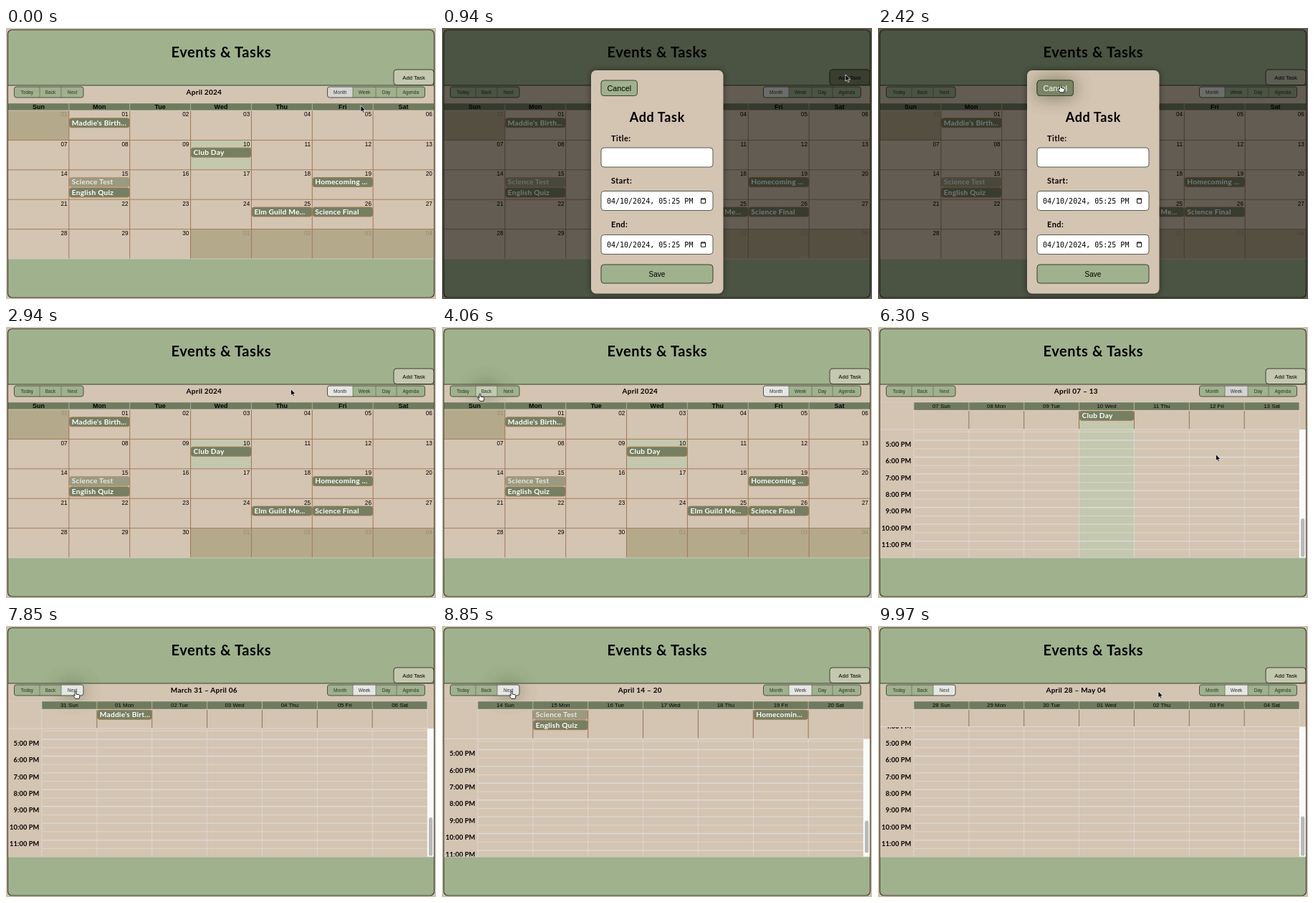
Animation, 600 px wide and 378 px high, one loop 10 s. Source, as an HTML page:

```html
<!DOCTYPE html>
<html lang="en">
<head>
<meta charset="utf-8">
<title>Events &amp; Tasks</title>
<style>
html, body { margin: 0; width: 100%; height: 100%; overflow: hidden; background: #d0c0ad; }
svg { display: block; width: 600px; height: 378px; }
text { font-family: "Liberation Sans", Arial, sans-serif; white-space: pre; }
.round { font-family: Lato, "Open Sans", sans-serif; font-weight: 700; }
.mono { font-family: "DejaVu Sans Mono", monospace; }
.mid { text-anchor: middle; }
.end { text-anchor: end; }
.tool { font-size: 6.6px; fill: #2f332c; }
.event { font-size: 10.2px; letter-spacing: .2px; fill: #fff; }
.past { opacity: .6; }
.glow { filter: url(#blur); fill: #4c5836; }
</style>
</head>
<body>
<svg id="stage" viewBox="0 0 600 378"></svg>
<script>
const LOOP = 10000;
const GREEN = '#9fb18d', TAN = '#d4c4b2', MUTED = '#b5a98c', DARK = '#707b5e',
      MOSS = '#757f62', PALE = '#c4c8ae', INK = '#3b4035', BROWN = '#a1764f';
const DAYS = ['Sun', 'Mon', 'Tue', 'Wed', 'Thu', 'Fri', 'Sat'];
const HOUR = 23.42, DAY_H = HOUR * 24, BOTTOM = 322;

const pad = n => String(n).padStart(2, '0');
const range = n => [...Array(n).keys()];
const rect = (x, y, w, h, fill, more = '') =>
  `<rect x="${x}" y="${y}" width="${w}" height="${h}" fill="${fill}" ${more}/>`;
const line = (x1, y1, x2, y2, color, w = 1) =>
  `<path d="M${x1} ${y1}L${x2} ${y2}" stroke="${color}" stroke-width="${w}"/>`;
const text = (x, y, s, cls = '', more = '') =>
  `<text x="${x}" y="${y}" class="${cls}" ${more}>${s.replace('&', '&amp;')}</text>`;
const event = (x, y, w, label, past) =>
  `<g class="${past ? 'past' : ''}">` +
  rect(x + .7, y, w - 1.2, 13, MOSS, `rx="3" stroke="${BROWN}" stroke-width=".9"`) +
  text(x + 4, y + 9.8, label, 'round event') + '</g>';

// Buttons: x, y, width, height, label, font size, hover text colour
const buttons = {
  today: [11.5, 82, 35.5, 15, 'Today'],
  back: [47, 82, 30, 15, 'Back'],
  next: [77, 82, 31, 15, 'Next'],
  month: [448.5, 82, 35.5, 15, 'Month'],
  week: [484, 82, 32, 15, 'Week'],
  day: [516, 82, 29, 15, 'Day'],
  agenda: [545, 82, 39.5, 15, 'Agenda'],
  add: [541, 58, 56, 21.5, 'Add Task', 7.7],
  cancel: [222, 73, 50.5, 21.5, 'Cancel', 10.8],
  save: [222, 330, 156, 26, 'Save', 10]
};
const TOOLS = ['today', 'back', 'next', 'month', 'week', 'day', 'agenda'];
const MODAL = ['cancel', 'save'];

const glow = id => {
  const [x, y, w, h] = buttons[id];
  return `<rect class="glow" id="glow-${id}" x="${x}" y="${y}" width="${w}" height="${h}" opacity="0"/>`;
};
const toolButton = id => {
  const [x, y, w, h, label] = buttons[id];
  return rect(x, y, w, h, GREEN, `id="face-${id}"`) +
    rect(x, y, w, h, '#c2cab0', `id="hover-${id}" opacity="0"`) +
    text(x + w / 2, 91.8, label, 'mid tool');
};
const toolGroup = (ids, clip) => {
  const [x, y] = buttons[ids[0]], last = buttons[ids[ids.length - 1]];
  const w = last[0] + last[2] - x;
  return `<clipPath id="${clip}">${rect(x, y, w, 15, '#000', 'rx="3"')}</clipPath>` +
    `<g clip-path="url(#${clip})">${ids.map(toolButton).join('')}` +
    ids.slice(1).map(id => line(buttons[id][0], y, buttons[id][0], y + 15, '#68735b', .8)).join('') + '</g>' +
    rect(x, y, w, 15, 'none', `rx="3" stroke="#4b5143"`);
};
const bigButton = (id, fill, hoverInk) => {
  const [x, y, w, h, label, size] = buttons[id];
  const shape = `rx="4" stroke="${INK}"`;
  const caption = ink => text(x + w / 2, y + h / 2 + size * .36, label, 'mid', `font-size="${size}" fill="${ink}"`);
  return rect(x, y, w, h, fill, shape) + caption('#000') +
    `<g id="hover-${id}" opacity="0">${rect(x, y, w, h, '#7a8464', shape)}${caption(hoverInk)}</g>`;
};

// Month view
const COL = 594 / 7, ROW = 41.4, TOP = 115;
const monthEvents = [
  [1, 0, 0, "Maddie's Birth..."], [3, 1, 0, 'Club Day'],
  [1, 2, 0, 'Science Test', true], [1, 2, 1, 'English Quiz'], [5, 2, 0, 'Homecoming ...'],
  [4, 3, 0, 'Elm Guild Me...'], [5, 3, 0, 'Science Final']
];
function monthView() {
  let s = rect(3, 105, 594, 10, DARK);
  DAYS.forEach((d, c) => {
    const x = 3 + c * COL;
    s += text(x + COL / 2, 112.9, d, 'mid', 'font-size="9" font-weight="700"');
    if (c) s += line(x, 105, x, 115, '#b9bda9', .8);
  });
  range(35).forEach(i => {
    const x = 3 + i % 7 * COL, y = TOP + Math.floor(i / 7) * ROW;
    const off = i < 1 || i > 30;
    const day = new Date(2024, 2, 31 + i).getDate();
    if (off || i === 10) s += rect(x, y, COL, ROW, off ? MUTED : PALE);
    s += text(x + COL - 2.2, y + 8.4, pad(day), 'end', `font-size="8.2" fill="${off ? '#958c79' : '#000'}"`);
  });
  range(6).forEach(c => s += line(3 + (c + 1) * COL, TOP, 3 + (c + 1) * COL, BOTTOM, '#98724f', .9));
  range(4).forEach(r => s += line(3, TOP + (r + 1) * ROW, 597, TOP + (r + 1) * ROW, BROWN, .9));
  s += line(3, 104.8, 597, 104.8, '#cfc9bd', .7) + line(3, TOP, 597, TOP, '#d8d4ca', .7);
  monthEvents.forEach(([c, r, n, label, past]) =>
    s += event(3 + c * COL, TOP + r * ROW + 10.8 + n * 14.4, COL, label, past));
  return s;
}

// Week view
const WCOL = 538 / 7;
const weeks = [
  { title: 'March 31 – April 06', top: 143, items: [[1, 0, "Maddie's Birt..."]] },
  { title: 'April 07 – 13', top: 143, items: [[3, 0, 'Club Day']] },
  { title: 'April 14 – 20', top: 157.4, items: [[1, 0, 'Science Test', true], [1, 1, 'English Quiz'], [5, 0, 'Homecomin...']] },
  { title: 'April 21 – 27', top: 143, items: [[4, 0, 'Elm Guild M...'], [5, 0, 'Science Final']] },
  { title: 'April 28 – May 04', top: 140.5, items: [] }
];
function weekHead({ top, items }, n) {
  let s = rect(50, 105, 538, 11, DARK);
  if (n === 1) s += rect(50 + 3 * WCOL, 116, WCOL, top - 116, PALE);
  DAYS.forEach((d, c) => {
    const x = 50 + c * WCOL, day = new Date(2024, 2, 31 + n * 7 + c).getDate();
    s += text(x + WCOL / 2, 113.2, `${pad(day)} ${d}`, 'mid', 'font-size="7.9"');
    s += line(x, 105, x, 116, '#c3c5b5', .8);
    if (c) s += line(x, 117, x, top - .5, '#8d6a4b', .9);
  });
  s += line(3, 104.8, 597, 104.8, '#d9d3ca', .7) + line(50, 116.3, 588, 116.3, '#d9d3ca', .8);
  s += line(50, 116, 50, top, '#ded8d0', .8) + line(588, 105, 588, top, '#ded8d0', .8);
  s += line(3, top, 588, top, '#dfdad4', 1.2);
  items.forEach(([c, r, label, past]) => s += event(50 + c * WCOL, 117.3 + r * 14.4, WCOL, label, past));
  return `<g id="week-${n}">${s}</g>`;
}
function weekBody() {
  let s = rect(50 + 3 * WCOL, 0, WCOL, DAY_H, PALE, 'id="today-col"');
  range(48).forEach(i => {
    const y = i * HOUR / 2;
    s += i % 2 ? line(50, y, 588, y, '#e2dbd2', .8) : line(50, y, 588, y, '#d9dbda', 1.4);
  });
  range(8).forEach(c => s += line(50 + c * WCOL, 0, 50 + c * WCOL, DAY_H, '#dedad4', .9));
  range(24).forEach(h => s += text(46.5, h * HOUR + 8.7, `${h % 12 || 12}:00 ${h < 12 ? 'AM' : 'PM'}`,
    'round end', 'font-size="9.3" letter-spacing=".1"'));
  return s;
}

const field = (y, value) => rect(222, y, 156, 27, '#fff', 'rx="4" stroke="#555a50"') + (value ?
  text(230, y + 17, value, 'mono', 'font-size="10"') +
  `<path d="M361.5 ${y + 10.5}h6v6.3h-6zM361.5 ${y + 11.4}h6M363 ${y + 9.5}v1M366 ${y + 9.5}v1" fill="none" stroke="#111"/>` : '');
const label = (y, s) => text(236, y, s, 'round', 'font-size="11" letter-spacing=".45"');

const $ = id => document.getElementById(id);
$('stage').innerHTML = `
<defs>
  <filter id="blur" x="-60" y="-60" width="720" height="500" filterUnits="userSpaceOnUse"><feGaussianBlur stdDeviation="13"/></filter>
  <filter id="soft" x="180" y="30" width="240" height="348" filterUnits="userSpaceOnUse"><feGaussianBlur stdDeviation="4"/></filter>
  <clipPath id="card"><rect x="208" y="59" width="184.5" height="311.5" rx="7"/></clipPath>
  <clipPath id="view"><rect id="view-box" x="3" width="594"/></clipPath>
</defs>
${rect(0, 0, 600, 378, '#d0c0ad')}
${rect(2.5, 2.5, 595, 373.5, GREEN, `rx="6" stroke="${INK}" stroke-width="1.2"`)}
${text(300.3, 41, 'Events & Tasks', 'round mid', 'font-size="20" letter-spacing=".6"')}
${rect(3, 80, 594, 242, TAN)}
${line(3, 80, 597, 80, INK, 1.2)}
${TOOLS.map(glow).join('')}
${bigButton('add', PALE, '#000')}
${toolGroup(TOOLS.slice(0, 3), 'left')}
${toolGroup(TOOLS.slice(3), 'right')}
${text(276.3, 92.8, '', 'round mid', 'id="title" font-size="10" letter-spacing=".25"')}
<g id="month-view">${monthView()}</g>
<g id="week-view">
  <g clip-path="url(#view)"><g id="week-body">${weekBody()}</g></g>
  ${rect(588, 0, 9, 0, '#fafaf8', 'id="track"')}
  ${rect(590, 0, 5.3, 0, '#b9b9b7', 'id="thumb" rx="2.6"')}
  ${weeks.map(weekHead).join('')}
</g>
${line(3, BOTTOM, 597, BOTTOM, '#cfcec2', .9)}
<g id="modal">
  ${rect(0, 0, 600, 378, '#000', 'opacity=".53"')}
  ${rect(208, 59, 184.5, 311.5, '#000', 'rx="7" opacity=".45" filter="url(#soft)"')}
  ${rect(208, 59, 184.5, 311.5, TAN, 'rx="7"')}
  <g clip-path="url(#card)">${MODAL.map(glow).join('')}</g>
  ${bigButton('cancel', GREEN, '#fff')}
  ${text(300.3, 130.5, 'Add Task', 'round mid', 'font-size="18" letter-spacing=".65"')}
  ${label(157.8, 'Title:')}${field(167)}
  ${label(217.2, 'Start:')}${field(227.5, '04/10/2024, 05:25 PM')}
  ${label(278.3, 'End:')}${field(288.5, '04/10/2024, 05:25 PM')}
  ${bigButton('save', GREEN, '#fff')}
</g>
<g id="cursor">
  <path id="arrow" d="M0 0V9.2L2.1 7.3L3.6 10.6L5.1 10L3.7 6.8H6.5Z" fill="#000" stroke="#fff" stroke-width=".7"/>
  <path id="hand" d="M-1 1C-1-.3 1-.3 1 1V4L4.6 4.8C5.7 5 6.1 5.7 5.9 6.8L5 10.4H0L-3.2 6.5C-3.6 5.4-2.4 5-1.6 5.8L-1 6.4Z" fill="#fff" stroke="#111" stroke-width=".9"/>
</g>`;

// Pointer stops: time, x, y
const path = [
  [0, 495, 108], [120, 495, 108], [600, 562, 66], [940, 563, 65], [1060, 560, 68],
  [1480, 320, 341], [1700, 318, 340], [2200, 255, 80], [2600, 254, 79],
  [3150, 466, 90], [3420, 564, 91], [3900, 56, 93], [4060, 53, 93], [4220, 30, 91],
  [4400, 92, 91], [4880, 562, 92], [5120, 504, 97.5], [5260, 500, 91], [5480, 500, 91],
  [5720, 420, 225], [6180, 420, 225], [6480, 564, 92], [6680, 466, 92], [7120, 30, 92],
  [7340, 62, 91], [7520, 62, 91], [7780, 97, 91], [9450, 97, 91], [9940, 391, 91], [LOOP, 391, 91]
];
const OPEN = 740, CLOSE = 2620, BACK = 7460, NEXT = 7830;
const weekAt = [[0, -1], [5380, 1], [BACK, 0], [7920, 1], [8450, 2], [8950, 3], [9380, 4]];

const ease = u => u * u * (3 - 2 * u);
const clamp = u => Math.min(1, Math.max(0, u));
function pointer(t) {
  t = Math.max(0, t);
  const i = path.findIndex(p => p[0] > t), [t0, x0, y0] = path[i - 1], [t1, x1, y1] = path[i];
  const u = ease((t - t0) / (t1 - t0));
  return [x0 + (x1 - x0) * u, y0 + (y1 - y0) * u];
}
const modalOpen = t => t >= OPEN && t < CLOSE;
function hit(t) {
  const [px, py] = pointer(t), open = modalOpen(t);
  return Object.keys(buttons).find(id => {
    const [x, y, w, h] = buttons[id];
    const live = id === 'add' || MODAL.includes(id) === open;
    return live && px >= x && px < x + w && py >= y && py < y + h;
  });
}
const set = (id, attrs) => { for (const k in attrs) $(id).setAttribute(k, attrs[k]); };
const show = (id, on) => { $(id).style.display = on ? '' : 'none'; };

function draw(t) {
  const week = weekAt.filter(w => w[0] <= t).pop()[1];
  const inWeek = week >= 0, over = hit(t), open = modalOpen(t);

  // Averaging recent hits gives the short hover fade.
  const recent = range(6).map(k => hit(t - k * 30));
  for (const id in buttons) {
    const level = recent.filter(r => r === id).length / 6;
    set('hover-' + id, { opacity: level });
    if (id !== 'add') set('glow-' + id, { opacity: level * .8 });
  }

  const active = inWeek ? 'week' : 'month';
  const pressed = inWeek ? t < BACK : t < OPEN;
  const focus = t >= NEXT ? 'next' : t >= BACK ? 'back' : '';
  for (const id of TOOLS) {
    const lit = id === active || id === focus;
    const gray = id === active && (pressed || over === id);
    set('face-' + id, { fill: gray ? '#d4d4d2' : lit ? '#e6e6e4' : GREEN });
    if (lit) set('hover-' + id, { opacity: 0 });
  }

  $('title').textContent = inWeek ? weeks[week].title : 'April 2024';
  show('month-view', !inWeek);
  show('week-view', inWeek);
  show('modal', open);
  if (inWeek) {
    const { top } = weeks[week], view = BOTTOM - top;
    const limit = DAY_H - (BOTTOM - (week === 4 ? top : 143));
    const scroll = limit * ease(clamp((t - 5740) / 400));
    weeks.forEach((w, n) => show('week-' + n, n === week));
    show('today-col', week === 1);
    set('view-box', { y: top, height: view });
    set('week-body', { transform: `translate(0 ${top - scroll})` });
    set('track', { y: top, height: view });
    set('thumb', { y: top + 2 + scroll / DAY_H * view, height: view * view / DAY_H - 3.5 });
  }

  const [x, y] = pointer(t), hand = over && !(open && over === 'add');
  set('cursor', { transform: `translate(${x} ${y})` });
  show('hand', hand);
  show('arrow', !hand);
}

const start = performance.now();
function tick() {
  draw((performance.now() - start) % LOOP);
  requestAnimationFrame(tick);
}
tick();
</script>
</body>
</html>
```
